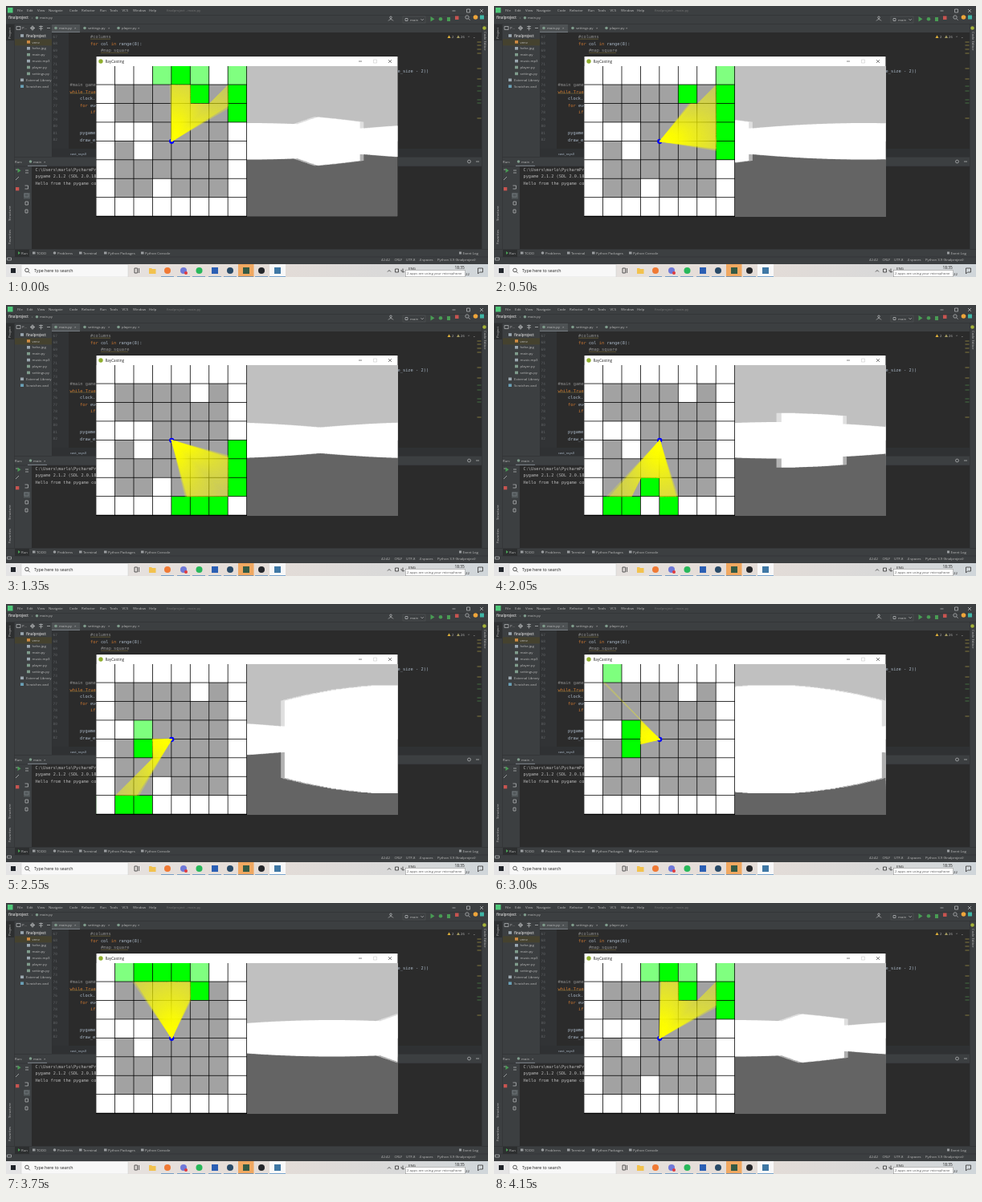
Animation of 600 by 338 pixels, one loop 4.2 s. Source, as an HTML page with a canvas:

```html
<!DOCTYPE html>
<html lang="en">
<head>
<meta charset="utf-8">
<title>RayCasting</title>
<style>
html, body { margin: 0; width: 100%; height: 100%; overflow: hidden; background: #2b2b2b; }
svg, canvas { position: absolute; left: 0; top: 0; width: 600px; height: 338px; }
#next { opacity: .5; }
text { font: 4.3px "Open Sans", "Noto Sans", sans-serif; fill: #bbb; white-space: pre; }
.code text { font: 5.35px "DejaVu Sans Mono", monospace; fill: #a9b7c6; }
.code .num { font-size: 4.4px; fill: #606366; }
.code .note { fill: #8c8c8c; }
.code .key, .code .key tspan { fill: #cc7832; }
.out text { font-size: 5.25px; fill: #bbb; }
.dark text { fill: #222; }
</style>
</head>
<body>
<svg viewBox="0 0 600 338">
  <defs>
    <linearGradient id="bar">
      <stop offset="0" stop-color="#e4e4e5"/><stop offset=".5" stop-color="#e6ddd7"/><stop offset="1" stop-color="#d0d6da"/>
    </linearGradient>
  </defs>

  <!-- IDE panels -->
  <rect width="600" height="338" fill="#3c3f41"/>
  <rect x="57" y="33" width="535" height="145" fill="#2b2b2b"/>
  <rect x="57" y="33" width="21" height="145" fill="#313335"/>
  <rect x="57" y="178" width="535" height="10" fill="#2f3133"/>
  <rect x="32" y="200" width="560" height="103" fill="#2b2b2b"/>
  <path d="M0 11.500H600M0 22.500H600M10.500 22V303M57.500 22V188M592.500 22V303M10 188.500H592M10 200H592M0 303.500H600M0 313H600" stroke="#2f3133" stroke-width=".6"/>
  <rect x="57" y="23" width="35" height="10" fill="#4e5254"/>
  <rect x="57" y="32" width="35" height="1" fill="#747a80"/>
  <rect x="27" y="198.800" width="24" height="1.200" fill="#747a80"/>
  <rect x="11" y="41.300" width="46" height="8" fill="#45422f"/>
  <rect x="0" y="23" width="10" height="20" fill="#2d2f30"/>
  <rect x="11" y="304" width="18" height="9" fill="#2d2f30"/>
  <rect x="2" y="2" width="6.500" height="6.500" fill="#4fc87a"/>

  <!-- toolbar icons -->
  <rect x="494" y="13" width="28" height="8" fill="none" stroke="#55585a" stroke-width=".5"/>
  <g fill="none" stroke="#afb1b3" stroke-width=".8">
    <path d="M476 18.500q3-4 6 0M497 15.500h3v3h-3zM516.500 16.200l1.700 1.700 1.700-1.700"/>
    <circle cx="479" cy="14.300" r="1.300"/>
    <circle cx="574" cy="14" r="2.200"/><path d="M575.600 15.700l2 2"/>
    <path d="M555.500 6h4M573.500 4h4v4h-4zM590 4l4 4M594 4l-4 4"/>
    <circle cx="33" cy="27.500" r="2"/><path d="M33 24.500v6M30 27.500h6M41 25.500h5M41 28h5M43.500 24.500v6M51 27.500h4"/>
    <circle cx="576.500" cy="194" r="1.900"/><path d="M585 194h4M13 25.500h5v4h-5z"/>
    <path d="M24 205h4M24 208h4M23.500 224h4v4h-4M23 234h5v4h-5zM24 244h3.500v4H24zM24 254h3v4h-3zM12 217l4-4M12 204h4M1.500 317h5v-3h-5z"/>
  </g>
  <g fill="#499c54"><path d="M528.500 13l5 3.200-5 3.200z"/><circle cx="541" cy="16.300" r="2.300"/><path d="M549 14h4v5h-4zM14.500 202.500l4 2.800-4 2.800z"/></g>
  <g fill="#c75450"><rect x="559" y="12.500" width="4.500" height="4.500"/><rect x="12" y="226" width="4.300" height="4.300"/></g>
  <circle cx="584.500" cy="14" r="2.800" fill="#efa53a"/>
  <rect x="590" y="11.500" width="5" height="5" fill="#3fb5a5"/>
  <circle cx="595.500" cy="27.500" r="2.300" fill="#a4b238"/>
  <rect x="22" y="233" width="8" height="7.500" fill="#5b6164" opacity=".7"/>
  <path d="M586.500 45h5M586.500 49h5M586.500 54h5M586.500 59h5M586.500 78h5M586.500 91h5M586.500 140h5" stroke="#a89a45" stroke-width=".7"/>
  <path d="M586.500 100h5M586.500 106h5M586.500 117h5M586.500 121h5" stroke="#4f8a4c" stroke-width=".7"/>
  <path d="M549.500 40l2-3.500 2 3.500z" fill="#e0b13a"/><path d="M561 40l2-3.500 2 3.500z" fill="#a39a62"/>

  <g id="labels"></g>
  <g class="code" id="code"></g>
  <g class="code out">
    <text x="36.500" y="205.700">C:\Users\marlo\PycharmPro</text>
    <text x="36.500" y="214.300">pygame 2.1.2 (SDL 2.0.18,</text>
    <text x="36.500" y="222.800">Hello from the pygame com</text>
  </g>
  <g id="tree"></g>
  <text transform="translate(6 41) rotate(-90)">Project</text>
  <text transform="translate(6 268) rotate(-90)">Structure</text>
  <text transform="translate(6 297) rotate(-90)">Favorites</text>
  <text transform="translate(594.500 32) rotate(90)">Code Editor</text>
  <path d="M15 306l3 2-3 2z" fill="#499c54"/>
  <g fill="#9a9da0"><path d="M33 306.500h3.500v3H33zM91 306.500h3.500v3H91zM122 306.500h3.500v3H122zM168 306.500h3.500v3H168zM564 306.500h3v3h-3z"/><circle cx="60.500" cy="308" r="1.800"/></g>

  <!-- taskbar -->
  <rect y="322" width="600" height="16" fill="url(#bar)"/>
  <rect x="19" y="322.500" width="133" height="15.500" fill="#f8f8f8" stroke="#ccc" stroke-width=".5"/>
  <rect x="6" y="327" width="6" height="6" fill="#20242a"/>
  <rect x="289" y="322" width="19.500" height="16" fill="#f0a861"/>
  <rect x="328" y="322" width="20" height="16" fill="#f8f8f8"/>
  <g fill="none" stroke="#333" stroke-width=".8">
    <circle cx="26" cy="329.500" r="2.300"/><path d="M27.700 331.200l2 2M160 327h3.500v6H160zM165.500 327v6M475 331.500l2-2 2 2M484.500 328h4v4h-4zM494 327.500v4M492 329q0 4 4 2.500M587.500 327h6v5h-4l-2 2z"/>
  </g>
  <path d="M178 327h3l1 1h4.500v6H178z" fill="#f2c24e"/>
  <g id="apps"></g>
  <path d="M193 337.500h16M213 337.500h16M232 337.500h16M252 337.500h16M271 337.500h16M289 337.500h19M310 337.500h16M328 337.500h20" stroke="#5a8fc0" stroke-width=".8"/>
  <g class="dark">
    <text x="35" y="332" style="font-size:5.300px">Type here to search</text>
    <text x="558.500" y="327.700" style="font-size:4.800px">18:35</text>
    <text x="501" y="328.500">ENG</text>
    <text x="572" y="335.500">22</text>
    <rect x="497.500" y="329.500" width="74" height="8.300" fill="#fff" stroke="#888" stroke-width=".5"/>
    <text x="499" y="335.300" style="fill:#555">2 apps are using your microphone</text>
  </g>

  <!-- game window frame -->
  <rect x="112" y="62.800" width="376" height="200.200" fill="#111"/>
  <rect x="112.500" y="63" width="375" height="12" fill="#fff"/>
  <circle cx="118" cy="69" r="2.700" fill="#8fae2e"/>
  <g class="dark"><text x="123.500" y="70.700" style="font-size:4.600px">RayCasting</text></g>
  <path d="M439 69h4M476 67l4 4M480 67l-4 4" stroke="#333" stroke-width=".6"/>
  <path d="M457.500 67h4v4h-4z" fill="none" stroke="#ccc" stroke-width=".6"/>
</svg>
<canvas id="now" width="600" height="338"></canvas>
<canvas id="next" width="600" height="338"></canvas>

<script>
const $ = id => document.getElementById(id);
const text = (x, y, s, cls = '') => `<text x="${x}" y="${y}" class="${cls}">${s}</text>`;

// Static labels
const rows = {
  7.2: [[14, 'File'], [26, 'Edit'], [39, 'View'], [53, 'Navigate'], [79, 'Code'], [94, 'Refactor'], [117, 'Run'],
    [129, 'Tools'], [144.5, 'VCS'], [158, 'Window'], [178, 'Help'], [200, '<tspan fill="#777">finalproject - main.py</tspan>']],
  16.3: [[3, '<tspan font-weight="700">finalproject</tspan>'], [32, '›'], [42, 'main.py']],
  18.5: [[503, 'main']],
  29: [[20, 'P…'], [66, 'main.py'], [85, '×'], [102, 'settings.py'], [127, '×'], [144, 'player.py'], [164, '×']],
  40: [[555, '2'], [566, '26'], [575, '^'], [581, '⌄']],
  195.7: [[11, 'Run:'], [34, 'main'], [47, '×']],
  309.6: [[19, 'Run'], [38, 'TODO'], [64, 'Problems'], [96, 'Terminal'], [127, 'Python Packages'], [173, 'Python Console'], [568.5, 'Event Log']],
  318: [[467, '42:42'], [483.5, 'CRLF'], [498, 'UTF-8'], [514.5, '4 spaces'], [537, 'Python 3.9 (finalproject)']]
};
const fileIcon = (x, y) => `<circle cx="${x}" cy="${y}" r="1.8" fill="#7f9c8c"/>`;
$('labels').innerHTML = Object.entries(rows).map(([y, row]) => row.map(([x, s]) => text(x, y, s)).join('')).join('') +
  fileIcon(38.5, 14.8) + fileIcon(62, 27.5) + fileIcon(98, 27.5) + fileIcon(140, 27.5) + fileIcon(30.5, 194);

const files = [[18, 'finalproject', '#9aa7b0'], [26, 'venv', '#d08b42'], [26, 'hehe.jpg', '#9aa7b0'], [26, 'main.py', '#7f9c8c'],
  [26, 'music.mp3', '#9aa7b0'], [26, 'player.py', '#7f9c8c'], [26, 'settings.py', '#7f9c8c'],
  [18, 'External Library', '#9aa7b0'], [18, 'Scratches and', '#6a9fb5']];
$('tree').innerHTML = files.map(([x, s, color], i) => {
  const y = 37 + i * 7.9;
  return `<rect x="${x}" y="${y - 1.8}" width="4" height="3.6" fill="${color}"/>` +
    text(x + (x < 20 ? 7 : 6.5), y + 1.6, i ? s : `<tspan font-weight="700">${s}</tspan>`);
}).join('');

// Editor: column, line offset, content, style
const lines = [[105, 0, '#columns', 'note'], [105, 1, '<tspan class="key">for </tspan>col <tspan class="key">in </tspan>range(8):'],
  [118, 2, '#map square', 'note'], [487.5, 5, 'e_size - 2))'], [79.5, 7, '#main game', 'note'], [79.5, 8, 'while True', 'key'],
  [92, 9, 'clock.'], [92, 10, '<tspan class="key">for </tspan>eve'], [105, 11, 'if', 'key'], [92, 14, 'pygame'], [92, 15, 'draw_e']];
const lineY = i => 40 + i * 8.58;
$('code').innerHTML = lines.map(([x, i, s, cls]) => text(x, lineY(i), s, cls)).join('') +
  Array.from({length: 16}, (_, i) => text(58.5, lineY(i) - .3, 67 + i, 'num')).join('') +
  '<path d="M79.500 109h32M105 41.200h25M118 58.300h34" stroke="#8a7a3e" stroke-width=".5"/>' +
  '<text x="80" y="185.500" style="font-size:4.200px;font-family:\'Open Sans\',sans-serif">cast_rays()</text>';

const dot = (x, color) => `<circle cx="${x}" cy="330" r="4" fill="${color}"/>`;
const square = (x, color) => `<rect x="${x - 4}" y="326" width="8" height="8" fill="${color}"/>`;
$('apps').innerHTML = dot(201, '#f07a35') + dot(221, '#7079d8') + '<circle cx="224" cy="333" r="2" fill="#e0393e"/>' +
  dot(240.5, '#27b85a') + square(260, '#2b5fb4') + dot(279, '#284a68') + square(299, '#355b45') + dot(318, '#25272b') + square(338, '#3f78a5');

// Ray caster in its own 960 x 480 space
const MAP = ['########', '#    # #', '#      #', '###    #', '# #    #', '#      #', '#  #   #', '########'];
const TILE = 60, PLAYER = 240, RAYS = 120, HALF = 240, SCALE = 480 / RAYS;
const START = -61.56, TURN = 1.7214; // degrees

function cast(degrees) {
  const angle = degrees * Math.PI / 180;
  const dx = Math.cos(angle), dy = Math.sin(angle);
  for (let depth = 0; ; depth++) {
    const x = PLAYER + dx * depth, y = PLAYER + dy * depth;
    const col = Math.floor(x / TILE), row = Math.floor(y / TILE);
    if (MAP[row][col] === '#') return {x, y, depth, cell: row * 8 + col};
  }
}

function draw(canvas, turns) {
  const c = canvas.getContext('2d');
  const box = (color, x, y, w, h) => { c.fillStyle = color; c.fillRect(x, y, w, h); };
  const walls = new Path2D(), beams = new Path2D(), lit = new Set();
  const left = START + turns * TURN - 30;
  for (let i = 0; i < RAYS; i++) {
    const hit = cast(left + i / 2);
    const height = Math.min(480, 21000 / hit.depth);
    lit.add(hit.cell);
    beams.moveTo(PLAYER, PLAYER);
    beams.lineTo(hit.x, hit.y);
    walls.rect(480 + i * SCALE, HALF - height / 2, SCALE, height);
  }

  c.setTransform(.390625, 0, 0, .390625, 112.5, 75);
  box('#000', 0, 0, 480, 480);
  box('#c0c0c0', 480, 0, 480, HALF);
  box('#646464', 480, HALF, 480, HALF);
  [...MAP.join('')].forEach((mark, cell) => {
    const color = lit.has(cell) ? '#0f0' : mark === '#' ? '#fff' : '#a2a2a2';
    box(color, cell % 8 * TILE, Math.floor(cell / 8) * TILE, TILE - 2, TILE - 2);
  });
  c.fillStyle = '#00f';
  c.beginPath();
  c.arc(PLAYER, PLAYER, 8, 0, 7);
  c.fill();
  c.strokeStyle = '#ff0';
  c.lineWidth = 1.3;
  c.stroke(beams);
  c.fillStyle = '#fff';
  c.fill(walls);
}

// The turning speed drifts: [time, turns made]
const PACE = [[0, 0], [500, 23], [1350, 62], [2050, 95], [2550, 123], [3400, 172], [4150, 210], [4200, 212]];
function turnsAt(t) {
  const i = PACE.findIndex(([end]) => end > t);
  const [t0, n0] = PACE[i - 1], [t1, n1] = PACE[i];
  return Math.round(n0 + (n1 - n0) * (t - t0) / (t1 - t0));
}

// Each picture blends two neighbouring turns
let shown = -1;
function frame() {
  const t = Math.floor(performance.now() % 4200 / 50) * 50;
  if (t !== shown) {
    const turns = turnsAt(t);
    draw($('now'), turns);
    draw($('next'), turns + 1);
    shown = t;
  }
  requestAnimationFrame(frame);
}
frame();
</script>
</body>
</html>
```
